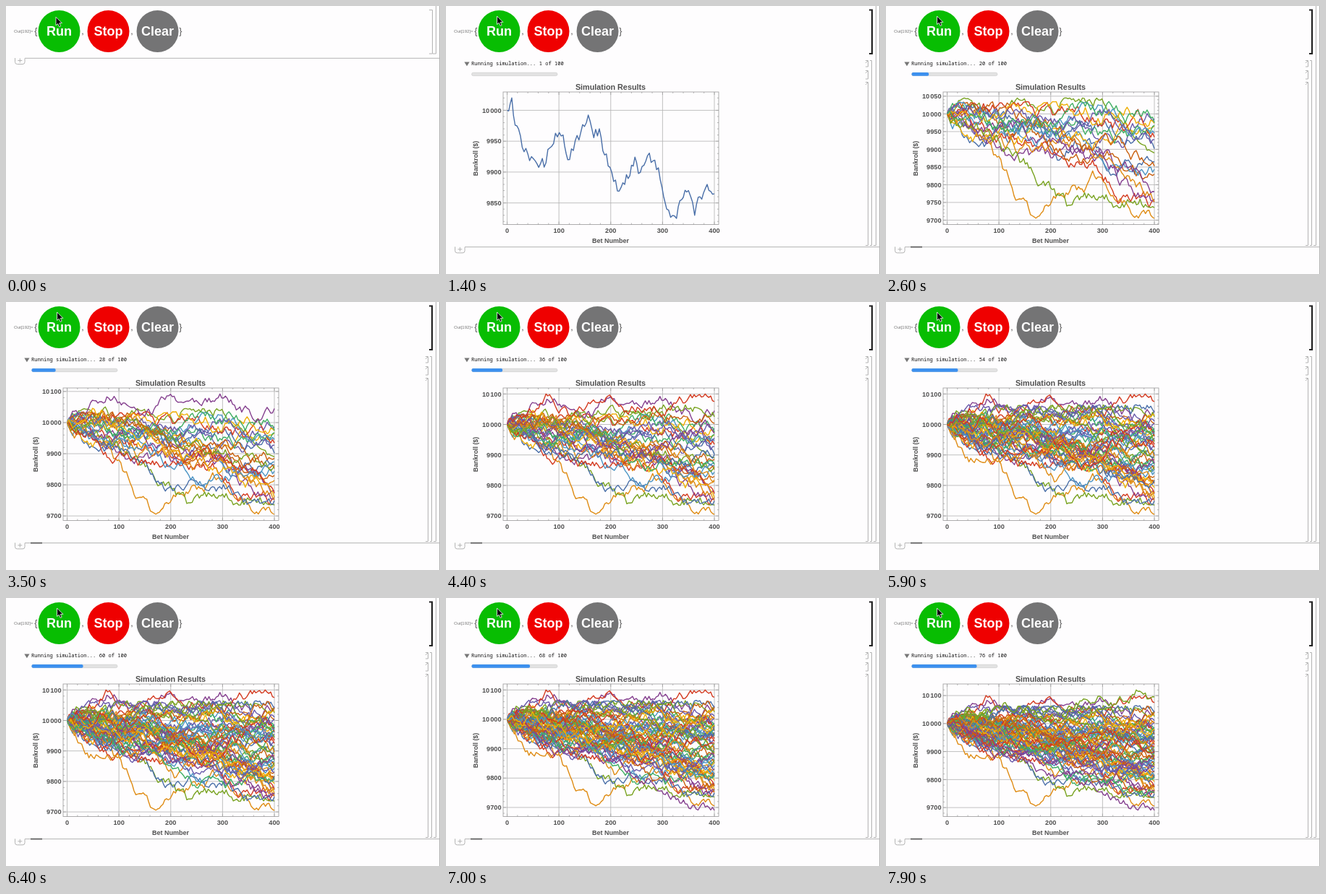
An HTML page for the animation above (8000 ms loop, 600 px wide and 371 px high).

```html
<!DOCTYPE html>
<html lang="en">
<head>
<meta charset="utf-8">
<title>Betting simulation</title>
<style>
  html, body { margin: 0; width: 100%; height: 100%; overflow: hidden; background: #fefdfe; }
  svg { display: block; width: 600px; height: 371px; }
  text { font-family: "Liberation Sans", Arial, sans-serif; }
  .bold { font-weight: bold; fill: #505050; }
  .mid { text-anchor: middle; }
  .end { text-anchor: end; }
  .button { font-size: 18px; font-weight: bold; fill: #fff; text-anchor: middle; }
  .thin { fill: none; stroke: #b4b4b4; stroke-width: 1; }
  .status { font: 7.1px "Noto Sans Mono", "DejaVu Sans Mono", monospace; fill: #111; }
</style>
</head>
<body>
<svg viewBox="0 0 600 371">
  <rect width="600" height="371" fill="#fefdfe"/>
  <path class="thin" d="M599.5 0V371"/>
  <text x="11" y="37.4" font-size="6" fill="#777">Out[192]=</text>
  <g font-size="12.5" fill="#555">
    <text x="39.3" y="39">{</text>
    <text x="104.3" y="38.5">,</text>
    <text x="172.3" y="38.5">,</text>
    <text x="239.2" y="39">}</text>
  </g>
  <g id="buttons"></g>

  <path id="idleBrackets" class="thin" d="M585 5.5H589.5V66H585M594.5 0V66H590"/>
  <path id="busyBracket" d="M585 5.5H589V66H585" fill="none" stroke="#222" stroke-width="2.2"/>

  <g id="insertion">
    <path class="thin" d="M26 72.3H599" stroke-width="1.2"/>
    <path class="thin" d="M12.5 72V77.5Q12.5 80.5 15.5 80.5H23Q26 80.5 26 77.5V72.5M16.3 75.5H22.3M19.3 72.5V78.5"/>
    <path id="caret" d="M34 72.3H50" stroke="#555" stroke-width="1.6"/>
  </g>

  <g id="output">
    <path class="thin" d="M580 75.5H583.5V84H580M580 79L583 76M580 89.5H583.5V101H580M580 93L583 90M580 105.5H583.5V331.5H580M580 109L583 106M586 75.5H588.5V331.5H586M594.5 0V331.5H591"/>
    <path d="M25.3 77.4H32.5L28.9 83.3Z" fill="#777"/>
    <text id="status" class="status" x="35" y="82"></text>
    <rect x="35.5" y="92.2" width="118.5" height="4.4" rx="2.2" fill="#e2e2e2" stroke="#c9c9c9" stroke-width=".6"/>
    <rect id="progress" x="35.5" y="92" width="0" height="4.8" rx="2" fill="#3c90ee"/>
    <text class="bold mid" x="227.5" y="115.5" font-size="10.8">Simulation Results</text>
    <text class="bold mid" x="227.5" y="328.3" font-size="9">Bet Number</text>
    <text class="bold mid" font-size="8.8" transform="translate(43.5 211) rotate(-90)">Bankroll ($)</text>
    <path id="grid" fill="none" stroke="#b2b2b2" stroke-width=".8"/>
    <g id="series" fill="none" stroke-width="1.4" stroke-linejoin="round"></g>
    <rect x="79" y="119" width="298" height="183.5" fill="none" stroke="#999" stroke-width=".8"/>
    <path id="ticks" fill="none" stroke="#999" stroke-width=".7"/>
    <g id="labels" class="bold" font-size="9.2"></g>
  </g>

  <path id="cursor" d="M0 0V11.5L2.7 9.2L4.6 13.4L6.6 12.5L4.8 8.4H8.4Z" fill="#000" stroke="#fff" stroke-width=".8"/>
</svg>
<script>
const LOOP = 8000, RUNS = 100, BETS = 400, START = 10000;
const PLOT = { left: 79, right: 377, top: 119, bottom: 302.5, x0: 84.5, xScale: 286.5 / BETS, high: 127.3, low: 294 };
const COLORS = ['#4a6fa8', '#df8c14', '#79a321', '#d33a20', '#85408f',
                '#c9600f', '#4b94c4', '#efaf06', '#6a5bab', '#3fae62'];
const $ = id => document.getElementById(id);

function add(parent, tag, attrs, text) {
  const node = document.createElementNS('http://www.w3.org/2000/svg', tag);
  for (const key in attrs) node.setAttribute(key, attrs[key]);
  if (text !== undefined) node.textContent = text;
  parent.appendChild(node);
  return node;
}

let seed = 20177;
function random() {
  seed = (seed + 0x6D2B79F5) | 0;
  let r = Math.imul(seed ^ (seed >>> 15), 1 | seed);
  r ^= r + Math.imul(r ^ (r >>> 7), 61 | r);
  return ((r ^ (r >>> 14)) >>> 0) / 4294967296;
}

// Key points [bet, profit] of the runs that stand out, by run index
const keyRuns = {
  0: [[0, 0], [9, 20], [22, -30], [47, -75], [75, -85], [108, -40], [117, -80], [153, -20], [178, -30],
      [195, -90], [227, -120], [250, -85], [299, -125], [308, -160], [327, -175], [350, -130], [362, -170],
      [386, -120], [400, -135]],
  1: [[0, 0], [100, -120], [140, -240], [185, -275], [240, -205], [298, -180], [345, -250], [400, -295]],
  2: [[0, 0], [33, 45], [80, 0], [215, 10], [230, 45], [275, 40], [340, -30], [400, -110]],
  12: [[0, 0], [130, -110], [231, -260], [300, -230], [400, -265]],
  24: [[0, 0], [150, 20], [295, 92], [400, 45]],
  33: [[0, 0], [75, 100], [150, 50], [180, 75], [230, 45], [375, 90], [400, 75]],
  64: [[0, 0], [200, -140], [400, -310]],
  72: [[0, 0], [200, 0], [365, 120], [400, 95]]
};

// An ordinary run only has a random end
const crowdRun = index => [[0, 0], [BETS, -255 + (index < 20 ? 250 : 300) * random()]];

// Random walk pinned to the key points and mirrored at both limits
function walk(keys, low, high) {
  const points = [keys[0]];
  for (let k = 1; k < keys.length; k++) {
    const [b0, v0] = keys[k - 1], [b1, v1] = keys[k];
    const steps = Math.max(1, Math.round((b1 - b0) / 3.5));
    const noise = [0];
    for (let s = 1; s <= steps; s++) noise.push(noise[s - 1] + (random() - .5) * 31);
    for (let s = 1; s <= steps; s++) {
      const u = s / steps;
      let value = v0 + (v1 - v0) * u + noise[s] - noise[steps] * u;
      if (value > high) value = 2 * high - value;
      if (value < low) value = 2 * low - value;
      points.push([b0 + (b1 - b0) * u, value]);
    }
  }
  return points;
}

const runs = [];
let high = -Infinity, low = Infinity;
for (let i = 0; i < RUNS; i++) {
  const keys = keyRuns[i] || crowdRun(i);
  const profits = keys.map(key => key[1]);
  const limits = keyRuns[i] ? [Math.min(...profits), Math.max(...profits)] : [-265, i < 20 ? 35 : 65];
  const points = walk(keys, ...limits);
  for (const [, profit] of points) {
    high = Math.max(high, profit);
    low = Math.min(low, profit);
  }
  const path = add($('series'), 'path', {
    d: 'M' + points.map(p => p[0].toFixed(1) + ' ' + p[1].toFixed(1)).join('L'),
    stroke: COLORS[i % COLORS.length], 'vector-effect': 'non-scaling-stroke'
  });
  runs.push({ path, high, low });
}

[['Run', '#08bd02'], ['Stop', '#ef0000'], ['Clear', '#747475']].forEach(([name, fill], i) => {
  const x = 73.5 + 68 * i;
  add($('buttons'), 'circle', { cx: x, cy: 35, r: 29, fill });
  add($('buttons'), 'text', { x, y: 41.3, class: 'button' }, name);
});

function drawAxes(toY, step) {
  const { left, right, top, bottom, x0, xScale } = PLOT;
  let grid = '', ticks = '';
  $('labels').textContent = '';
  for (let bet = 0; bet <= BETS; bet += 20) {
    const x = x0 + bet * xScale, major = bet % 100 === 0, size = major ? 4 : 2;
    ticks += `M${x} ${top}v${size}M${x} ${bottom}v${-size}`;
    if (!major) continue;
    grid += `M${x} ${top}V${bottom}`;
    add($('labels'), 'text', { x, y: 313.6, class: 'mid' }, bet);
  }
  for (let profit = -400; profit <= 200; profit += step / 5) {
    const y = toY(profit), major = profit % step === 0, size = major ? 4 : 2;
    if (y < top + 1 || y > bottom - 1) continue;
    ticks += `M${left} ${y}h${size}M${right} ${y}h${-size}`;
    if (!major) continue;
    grid += `M${left} ${y}H${right}`;
    const digits = String(START + profit);
    const label = add($('labels'), 'text', { x: 76.5, y: y + 3.2, class: 'end' });
    add(label, 'tspan', {}, digits.slice(0, -3));
    add(label, 'tspan', { dx: digits.length > 4 ? 1 : 0 }, digits.slice(-3));
  }
  $('grid').setAttribute('d', grid);
  $('ticks').setAttribute('d', ticks);
}

let shown = 0;
function drawRuns(count) {
  if (count === shown) return;
  shown = count;
  const { high, low } = runs[count - 1];
  const scale = (PLOT.low - PLOT.high) / (high - low);
  const toY = profit => PLOT.high + (high - profit) * scale;
  $('series').setAttribute('transform', `matrix(${PLOT.xScale} 0 0 ${-scale} ${PLOT.x0} ${toY(0)})`);
  runs.forEach((run, i) => run.path.setAttribute('display', i < count ? 'inline' : 'none'));
  drawAxes(toY, high - low > 360 ? 100 : 50);
  $('status').textContent = `Running simulation... ${count} of ${RUNS}`;
  $('progress').setAttribute('width', count > 1 ? count * 1.185 : 0);
}

// [time, finished runs]
const pace = [[1500, 1], [2600, 20], [4400, 36], [5900, 54], [7000, 68], [7900, 76]];
function runCount(t) {
  if (t <= pace[0][0]) return 1;
  for (let k = 1; k < pace.length; k++) {
    const [t0, n0] = pace[k - 1], [t1, n1] = pace[k];
    if (t < t1) return Math.floor(n0 + (n1 - n0) * (t - t0) / (t1 - t0));
  }
  return pace[pace.length - 1][1];
}

const show = (id, on) => $(id).setAttribute('display', on ? 'inline' : 'none');

function render(time) {
  const t = Math.floor((time % LOOP) / 100) * 100;
  const running = t >= 1000, output = t >= 1300;
  show('idleBrackets', !running);
  show('busyBracket', running);
  show('output', output);
  show('caret', (t >= 400 && t < 900) || t >= 2000);
  $('insertion').setAttribute('transform', `translate(0 ${output ? 261.3 : 0})`);
  const move = Math.max(0, Math.min(1, (t - 200) / 300));
  $('cursor').setAttribute('transform', `translate(${69 + 1.5 * move} ${15.3 - 1.3 * move})`);
  if (output) drawRuns(runCount(t));
}

const began = performance.now();
function frame() {
  render(performance.now() - began);
  requestAnimationFrame(frame);
}
render(0);
requestAnimationFrame(frame);
</script>
</body>
</html>
```
